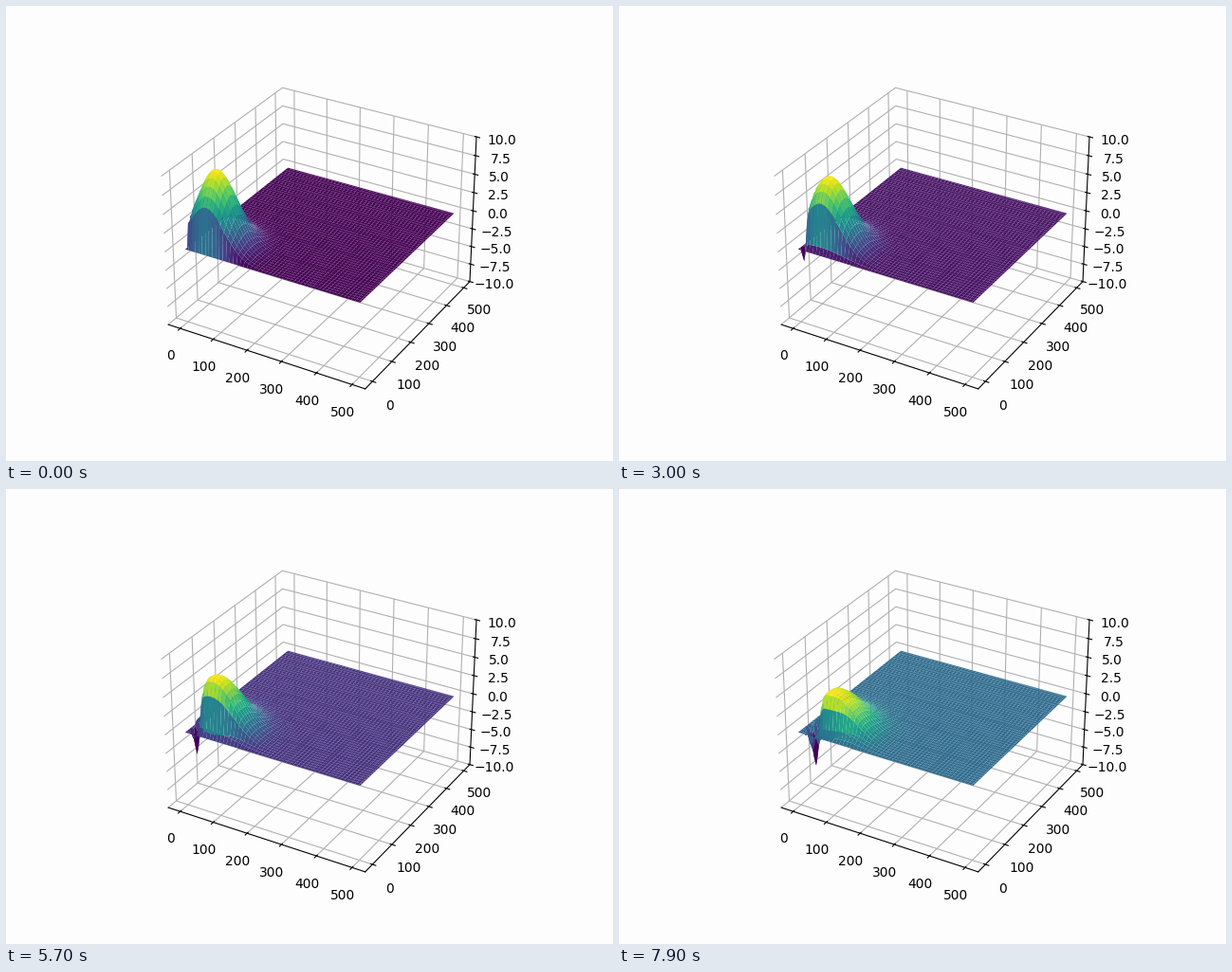
Recreate the animation shown at these times as a matplotlib script. Size 640x480 px, loop 8000 ms.

```python
import numpy as np
import matplotlib.pyplot as plt
from matplotlib.animation import FuncAnimation

FRAMES = 80
N = 100          # simulation nodes per side
STRIDE = 2       # nodes per drawn patch
COURANT = 0.1    # wave speed * time step / node spacing
PAPER = "#fdfdfd"


def clamp_edges(u):
    u[0] = u[-1] = 0
    u[:, 0] = u[:, -1] = 0
    return u


def simulate(u, steps):
    """Wave equation with fixed edges, starting at rest; one state per step."""
    old, u = u, u.copy()
    states = []
    for k in range(steps):
        lap = np.zeros_like(u)
        lap[1:-1, 1:-1] = (u[2:, 1:-1] + u[:-2, 1:-1] + u[1:-1, 2:]
                           + u[1:-1, :-2] - 4 * u[1:-1, 1:-1])
        gain = COURANT ** 2 * (0.5 if k == 0 else 1)
        old, u = u, clamp_edges(2 * u - old + gain * lap)
        states.append(u)
    return states


def patch_indices():
    """Row and column indices of the eight perimeter nodes of every patch."""
    start = np.arange(0, N - 1, STRIDE)
    r0, c0 = (a.ravel()[:, None] for a in np.meshgrid(start, start, indexing="ij"))
    dr = np.array([0, 0, 0, 1, 2, 2, 2, 1])
    dc = np.array([0, 1, 2, 2, 2, 1, 0, 0])
    return np.minimum(r0 + dr, N - 1), np.minimum(c0 + dc, N - 1)


side = np.linspace(0, 500, N)
X, Y = np.meshgrid(side, side)
bump = 10 * np.exp(-((X - 60) ** 2 + (Y - 60) ** 2) / (2 * 50 ** 2))
states = simulate(clamp_edges(bump), FRAMES)
rows, cols = patch_indices()
px, py = X[rows, cols], Y[rows, cols]

fig = plt.figure(figsize=(6.4, 4.8), dpi=100, facecolor=PAPER)
ax = fig.add_subplot(projection="3d")
ax.set_facecolor(PAPER)
for axis in (ax.xaxis, ax.yaxis, ax.zaxis):
    axis.set_pane_color(PAPER)
surf = ax.plot_surface(X, Y, states[0], cmap="viridis")
ax.set_zlim(-10, 10)


def draw(i):
    pz = states[i][rows, cols]
    level = pz.mean(axis=1)
    surf.set_verts(np.stack([px, py, pz], axis=-1))
    surf.set_array(level)
    surf.set_clim(level.min(), level.max())
    return surf,


anim = FuncAnimation(fig, draw, frames=FRAMES, interval=100, repeat=True)
plt.show()
```
